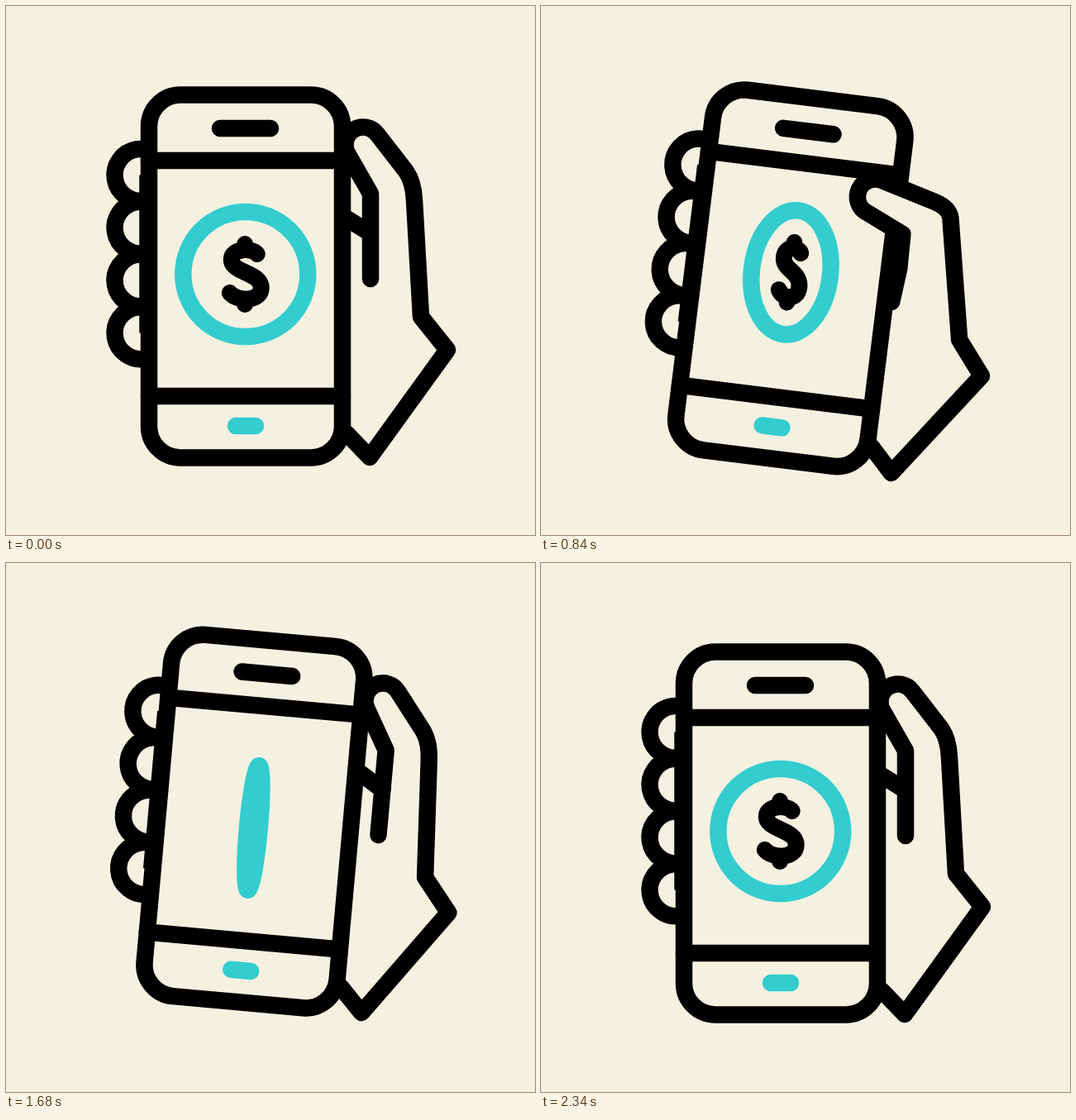
Animation of 640 by 640 pixels, one loop 2.82 s. Source, as an HTML page with a canvas:

```html
<!DOCTYPE html>
<html lang="en">
<head>
<meta charset="utf-8">
<title>Mobile payment</title>
<style>
html, body { margin: 0; height: 100%; overflow: hidden; background: #f5f1e1; }
canvas { display: block; width: 100vw; height: 100vh; }
</style>
</head>
<body>
<canvas id="stage" width="640" height="640"></canvas>
<script>
const ctx = document.getElementById('stage').getContext('2d');
const PAPER = '#f5f1e1', INK = '#000', TEAL = '#33cdcf';
const LOOP = 2820;
const PIVOT = [456, 435];

const progress = (t, from, to) => Math.min(1, Math.max(0, (t - from) / (to - from)));
const ease = (t, from, to) => {
  const p = progress(t, from, to);
  return p * p * (3 - 2 * p);
};
const mix = (a, b, k) => a + (b - a) * k;

function stroke(color = INK, width = 20.5) {
  ctx.strokeStyle = color;
  ctx.lineWidth = width;
  ctx.stroke();
}

function line(x1, y1, x2, y2, color) {
  ctx.beginPath();
  ctx.moveTo(x1, y1);
  ctx.lineTo(x2, y2);
  stroke(color);
}

function drawFingers() {
  ctx.lineCap = 'butt';
  for (let i = 0; i < 4; i++) {
    ctx.beginPath();
    ctx.arc(163, 204.5 + i * 63.7, 31.5, 1.4, 4.9);
    stroke();
  }
  line(171.5, 204.5, 171.5, 395.5);
  ctx.lineCap = 'round';
}

function drawPhone() {
  ctx.beginPath();
  ctx.roundRect(173, 107.5, 234, 439, 38);
  ctx.fillStyle = PAPER;
  ctx.fill();
  stroke();
  line(173, 187, 407, 187);
  line(173, 472, 407, 472);
  line(259, 148, 320, 148);
  line(278, 508, 302, 508, TEAL);
}

function drawCoin(t) {
  const x = progress(t, 670, 2350);
  const turns = 2 * (x - 0.052 * Math.sin(2 * Math.PI * x));
  const squash = Math.cos(2 * Math.PI * turns);
  const y = -25 * ease(t, 670, 1305) + 50 * ease(t, 1305, 1890) - 25 * ease(t, 1890, 2340);

  ctx.save();
  ctx.translate(289.75, 324.5 + y);

  // The path is squashed but the stroke keeps its width.
  ctx.save();
  ctx.scale(squash || 1e-4, 1);
  ctx.beginPath();
  ctx.moveTo(14, -24.5);
  ctx.bezierCurveTo(10, -31.5, -17, -32.5, -17, -17.5);
  ctx.bezierCurveTo(-17, -1.5, 19, -2.5, 19, 16.5);
  ctx.bezierCurveTo(19, 33.5, -10, 33.5, -19, 22.5);
  ctx.moveTo(-0.7, -36.5);
  ctx.lineTo(-0.7, -30);
  ctx.moveTo(-0.7, 30);
  ctx.lineTo(-0.7, 36.5);
  ctx.restore();
  stroke(INK, 20);

  ctx.beginPath();
  ctx.ellipse(0, 0, 75.5 * Math.abs(squash), 75.5, 0, 0, 2 * Math.PI);
  stroke(TEAL);
  ctx.restore();
}

// press: 0 = thumb beside the phone, 1 = thumb on the screen
function drawHand(press) {
  const at = (x1, y1, x2, y2) => [mix(x1, x2, press), mix(y1, y2, press)];
  const corner = at(441, 227, 418, 257.5);
  const joint = at(441, 275, 418, 282);
  const bend = at(441, 290, 419, 298.6);
  const end = at(441, 330, 415, 340.4);
  const tip = at(432, 168, 379.7, 216.8);
  const knuckle = at(484, 200, 452, 214);
  const control = at(493, 213, 469.7, 218.9);
  const back = at(494, 235, 473.1, 230.6);
  const rad = Math.PI / 180;

  const thumb = () => {
    ctx.lineTo(...corner);
    ctx.arc(...tip, 21.5, mix(149, 110, press) * rad, mix(323, 283, press) * rad);
    ctx.lineTo(...knuckle);
    ctx.quadraticCurveTo(...control, ...back);
  };

  ctx.beginPath();
  thumb();
  ctx.fillStyle = PAPER;
  ctx.fill();

  line(412, 257, ...joint);
  ctx.beginPath();
  ctx.moveTo(...end);
  ctx.lineTo(...bend);
  thumb();
  ctx.lineTo(502, 376);
  ctx.lineTo(534, 416);
  ctx.lineTo(440, 546);
  ctx.lineTo(412, 517);
  stroke();
}

function drawRipple(t) {
  const p = ease(t, 1240, 1640);
  if (p === 0 || p === 1) return;
  ctx.globalAlpha = 1 - p;
  ctx.beginPath();
  ctx.arc(369, 229, 10 + 52 * p, 0, 2 * Math.PI);
  stroke(TEAL);
  ctx.globalAlpha = 1;
}

function draw(t) {
  const tilt = 10 * (ease(t, 200, 1200) - ease(t, 1185, 2195));
  const release = ease(t, 1000, 1612);
  const dip = 22 * (ease(t, 200, 580) - release);
  const press = ease(t, 200, 540) - release;

  ctx.fillStyle = PAPER;
  ctx.fillRect(0, 0, 640, 640);
  ctx.lineJoin = 'round';

  ctx.save();
  ctx.translate(...PIVOT);
  ctx.rotate(tilt * Math.PI / 180);
  ctx.translate(-PIVOT[0], -PIVOT[1] + dip);
  drawFingers();
  drawPhone();
  drawCoin(t);
  drawHand(press);
  drawRipple(t);
  ctx.restore();
}

const start = performance.now();
function frame() {
  draw((performance.now() - start) % LOOP);
  requestAnimationFrame(frame);
}
frame();
</script>
</body>
</html>
```
